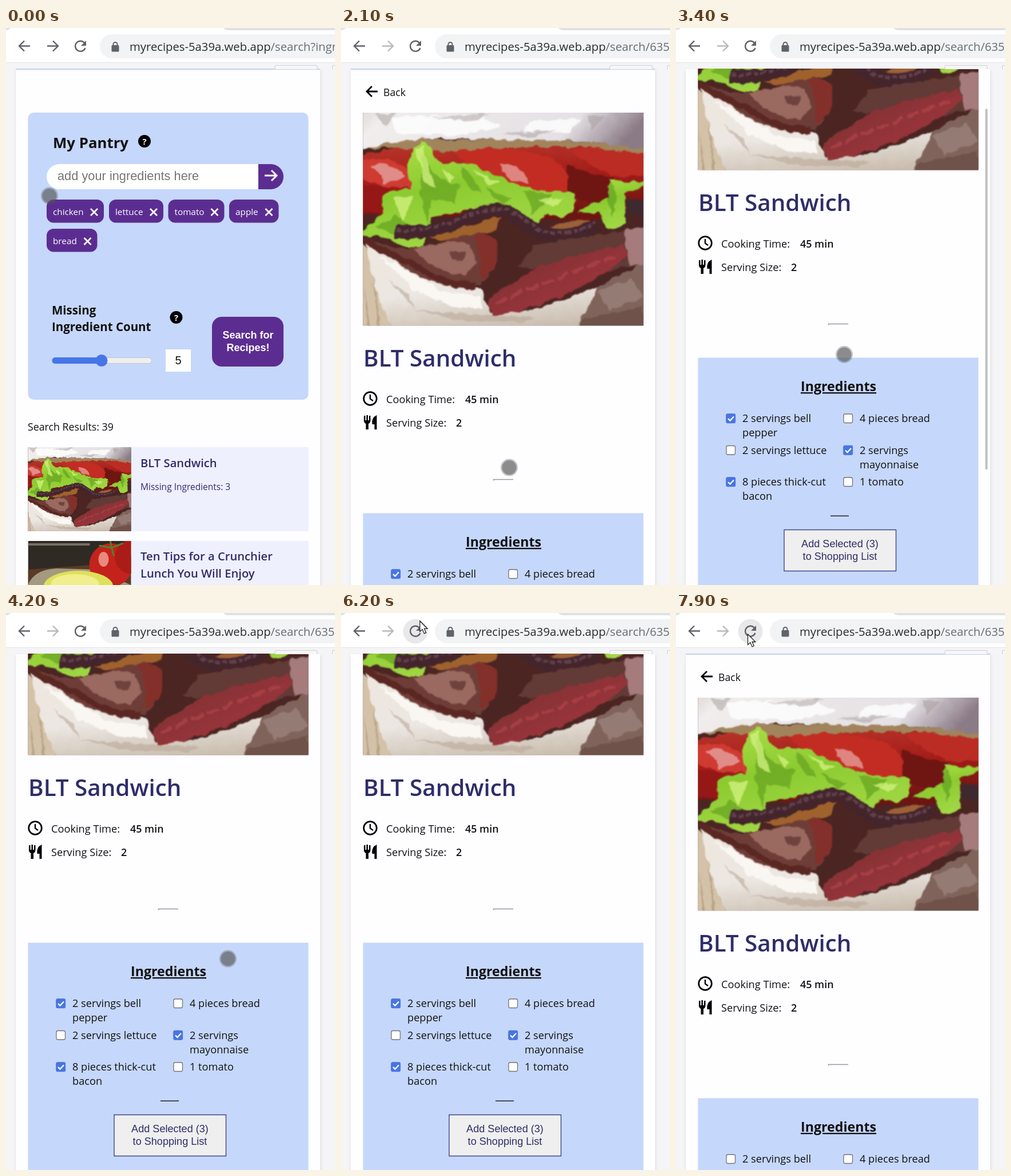
Animation of 575x974 px, one loop 8 s. Source, as an HTML page:

```html
<!DOCTYPE html>
<html lang="en">
<head>
<meta charset="utf-8">
<title>Pantry recipes</title>
<style>
  html, body { margin: 0; width: 100%; height: 100%; overflow: hidden; background: #fff; }
  svg { display: block; }
  text { font: 18.2px "Open Sans", "Noto Sans", sans-serif; fill: #111; }
  .sans { font-family: "Liberation Sans", Arial, sans-serif; }
  .mid { text-anchor: middle; }
  .semi { font-weight: 600; }
  .bold { font-weight: 700; }
  .navy { fill: #2e2d69; }
  .white { fill: #fff; }
  .purple { fill: #5c2d91; }
  .panel { fill: #c5d7fb; }
  .line { fill: none; stroke: #5f6368; stroke-width: 2.4; }
</style>
</head>
<body>
<svg width="575" height="974" viewBox="0 0 575 974">
  <defs>
    <clipPath id="view"><path d="M0 71H575V974H0z"/></clipPath>
    <filter id="rough" x="0" y="0" width="1" height="1" color-interpolation-filters="sRGB">
      <feTurbulence type="fractalNoise" baseFrequency=".06" numOctaves="2" seed="4"/>
      <feDisplacementMap in="SourceGraphic" scale="11" xChannelSelector="R" yChannelSelector="G"/>
      <feGaussianBlur stdDeviation="1.3"/>
    </filter>
    <filter id="glow"><feGaussianBlur stdDeviation="2.5"/></filter>
    <linearGradient id="crumb" x2="1" y2=".15">
      <stop stop-color="#d3ccc6"/><stop offset=".15" stop-color="#f0edec"/>
      <stop offset=".78" stop-color="#e4e0e4"/><stop offset="1" stop-color="#8b7b86"/>
    </linearGradient>
    <linearGradient id="red" y2="1" x2=".2">
      <stop stop-color="#b8372b"/><stop offset=".5" stop-color="#a51d19"/><stop offset="1" stop-color="#6d1512"/>
    </linearGradient>
    <linearGradient id="leaf" x2=".4" y2="1">
      <stop stop-color="#aee04a"/><stop offset=".5" stop-color="#8ccb30"/><stop offset="1" stop-color="#a2d846"/>
    </linearGradient>
    <linearGradient id="rasher" y2="1">
      <stop stop-color="#74302f"/><stop offset=".6" stop-color="#96343a"/><stop offset="1" stop-color="#7a2531"/>
    </linearGradient>
    <linearGradient id="loaf" x2=".2" y2="1">
      <stop stop-color="#efe7de"/><stop offset=".6" stop-color="#ece7e2"/><stop offset="1" stop-color="#c9bdae"/>
    </linearGradient>
    <symbol id="photo" viewBox="0 0 490 372" preserveAspectRatio="xMidYMid slice">
      <path fill="#4a2522" d="M0 0H490V372H0z"/>
      <g filter="url(#rough)">
        <path fill="#4a2522" d="M-20-20H510V392H-20z"/>
        <path fill="#d3c1a8" d="M-20 215L80 290 130 392H-20z"/>
        <path fill="#b8a284" d="M14 260L34 392H29zM30 310L60 392H53zM4 300L14 392H8z"/>
        <path fill="url(#loaf)" d="M5 222Q60 255 130 296L205 306 222 350 290 346 410 305 370 392H60Q16 320 5 222z"/>
        <path fill="#faf7f3" d="M30 252Q90 280 140 312L205 320 208 345 150 338 90 310z"/>
        <path fill="#bba99a" d="M90 345L200 352 300 358 280 366 180 364zM44 290L80 318 92 344z" opacity=".6"/>
        <path fill="#80645c" d="M365 392L410 305 510 250V392z"/>
        <path fill="#a28a82" d="M410 312L470 290 490 320 430 345z" opacity=".6"/>
        <path fill="#65463f" d="M380 362L490 338V385H375z" opacity=".6"/>

        <path fill="url(#red)" d="M-20 80L80 55 150 60 400 56 510 70V150L400 190 80 180-20 180z"/>
        <path fill="#cf3a31" d="M-10 84Q70 70 100 120L104 136 40 128-10 112z"/>
        <path fill="#e6a8a8" d="M14 92Q50 84 76 112L40 122z" opacity=".75"/>
        <path fill="#951817" d="M-10 122L50 130 35 176H-10z"/>
        <path fill="#c22c23" d="M150 66Q260 55 330 80 372 110 358 138 300 146 230 118z"/>
        <path fill="#e59b97" d="M235 88Q285 92 290 124 255 124 235 88z" opacity=".8"/>
        <path fill="#ba2c24" d="M365 66Q430 55 500 72V112L440 110Q390 94 365 66z"/>
        <path fill="#6f1613" d="M355 90Q400 110 440 112L425 165 360 145z"/>
        <path fill="#a1845c" d="M5 62Q60 42 150 48L300 46 510 60V74L380 60 250 60 150 68 60 62z"/>
        <path fill="url(#crumb)" d="M-20-20H510V66Q400 48 300 48L150 46Q60 44 5 64L-20 60z"/>
        <path fill="#fff" opacity=".8" d="M50 8L200 4 240 24 170 40 60 36zM290 14L380 10 360 36 280 34z"/>
        <path fill="#a49c9a" opacity=".5" d="M20 4L60 0 40 24zM120 8L220 2 190 16zM390 4L420 8 400 30zM240 36L340 30 300 42z"/>

        <path fill="url(#leaf)" d="M0 206L34 176 34 148 50 136 84 134 78 90 88 62 104 50 120 60 122 78 142 90 190 86 212 100 254 118 300 136 368 140 370 166 352 184 322 176 306 194 280 186 240 164 180 170 120 182 106 236 80 236 36 218-10 214z"/>
        <path fill="#69a522" opacity=".75" d="M106 66Q112 110 168 128L160 160 120 150 112 196 100 140zM170 94Q170 130 205 140 200 110 170 94zM280 136Q300 160 290 180 320 160 330 144zM20 198L60 180 84 200 50 212zM214 130L260 150 240 160z"/>
        <path fill="#d5f383" opacity=".75" d="M90 66L106 58 116 100 128 130 110 124zM52 148L90 144 70 190zM140 98L160 110 150 120zM190 100L240 122 220 126zM306 150L350 150 330 166z"/>
        <path fill="url(#leaf)" d="M430 116Q460 124 500 118V126L456 142 458 194 440 204 424 198 412 174 376 174 396 160 430 150z"/>
        <path fill="#5a9a20" d="M432 122L444 146 436 184 428 150z" opacity=".6"/>
        <path fill="#3f2930" d="M458 148L500 156V184L458 172z"/>

        <path fill="#a0622c" d="M110 216L190 196 246 178 232 204 150 224z"/>
        <path fill="#9c6137" d="M310 210Q350 184 405 190L396 212 340 222z"/>
        <path fill="none" stroke="#44252b" stroke-width="23" stroke-linejoin="round" d="M55 208Q110 212 160 194 220 166 252 172 276 188 300 205 350 228 409 196"/>
        <path fill="none" stroke="#765064" stroke-width="6" opacity=".6" stroke-dasharray="9 4" d="M58 204Q110 207 158 190 220 162 255 169 290 192 308 204 350 222 407 192"/>

        <path fill="#6f3d37" d="M4 215Q50 244 96 236L190 212Q210 206 222 216 244 260 212 294 190 312 150 302 80 290 4 215z"/>
        <path fill="#9a6a60" d="M90 240Q150 218 186 232 212 268 178 282 130 286 90 240z"/>
        <path fill="#5d3231" d="M150 244L180 240 176 260 158 258z" opacity=".7"/>
        <path fill="#83302a" d="M194 214Q230 204 236 240 236 276 206 292 206 240 194 214z"/>
        <path fill="none" stroke="#5a2723" stroke-width="11" d="M4 220Q45 252 90 264 130 300 198 302"/>
        <path fill="#623a36" d="M300 230L500 200V262L400 280 270 270z"/>
        <path fill="#a57b7b" d="M455 206L500 198V264L466 268z"/>
        <path fill="url(#rasher)" d="M218 336Q222 318 252 302L310 268 370 250 456 230 463 250 400 294 340 324 280 345 226 355z"/>
        <path fill="none" stroke="#b5494d" stroke-width="6" opacity=".6" stroke-dasharray="22 7" d="M232 334Q290 305 350 285L448 248"/>
      </g>
    </symbol>
    <g id="help">
      <circle r="11"/>
      <text class="mid bold white" y="5.5" style="font-size:15px">?</text>
    </g>
    <path id="left" d="M20 0H1M10-9L1 0 10 9"/>
  </defs>

  <path fill="#f5f4f6" d="M0 0H575V974H0z"/>
  <path fill="#dcdbe0" filter="url(#glow)" d="M17 74H550V990H17z"/>
  <path fill="#fefdff" d="M17 72H549V974H17z"/>

  <g clip-path="url(#view)">
    <path id="edge" fill="#c3d3f3" d="M17 71H549V73H17z"/>

    <g id="search">
      <rect class="panel" x="38.5" y="148" width="490" height="502" rx="10"/>
      <text class="bold" x="82" y="210" style="font-size:25.8px">My Pantry</text>
      <use href="#help" x="242" y="198"/>
      <path class="white" d="M441 238H93A22 22 0 0 0 93 282H441z"/>
      <path class="purple" d="M441 238H463A22 22 0 0 1 463 282H441z"/>
      <path fill="none" stroke="#fff" stroke-width="3" d="M452 258H473M464 249L473 258 464 267"/>
      <text class="sans" x="90" y="266" style="font-size:21.8px;fill:#757575">add your ingredients here</text>
      <g id="chips"></g>
      <text class="bold" x="80" y="501" style="font-size:20.5px">Missing</text>
      <text class="bold" x="80" y="530" style="font-size:20.5px">Ingredient Count</text>
      <use href="#help" x="297.5" y="506"/>
      <rect x="81" y="576.5" width="173.5" height="10" rx="5" fill="#efefef" stroke="#c4c4cc"/>
      <rect x="80.5" y="576" width="90" height="11" rx="5.5" fill="#4675e8"/>
      <circle cx="167" cy="581.5" r="10.5" fill="#4675e8"/>
      <path class="white" d="M279 562H323V601H279z"/>
      <text class="sans mid" x="301" y="588" style="font-size:20px">5</text>
      <rect class="purple" x="360" y="505" width="125" height="87" rx="17"/>
      <text class="sans mid bold white" x="423" y="543" style="font-size:18px">Search for</text>
      <text class="sans mid bold white" x="423" y="565" style="font-size:18px">Recipes!</text>
      <text x="38" y="704" style="font-size:17.8px">Search Results: 39</text>
      <path fill="#eef0fe" d="M39 733H528.5V880H39zM39 897H528.5V974H39z"/>
      <use href="#photo" x="38.5" y="733" width="180" height="147"/>
      <text class="semi navy" x="235" y="768" style="font-size:20.2px">BLT Sandwich</text>
      <text class="navy" x="235" y="808" style="font-size:15.5px">Missing Ingredients: 3</text>
      <svg x="38.5" y="897" width="180" height="77">
        <path fill="#2f2a24" d="M0 0H180V77H0z"/>
        <path fill="#777064" d="M0 4H108V8H0z"/>
        <path fill="#5b3a26" d="M0 50L110 42 180 60V77H0z"/>
        <path fill="#a39a80" d="M0 77Q10 50 50 48L120 50 180 77z"/>
        <circle cx="145" cy="42" r="38" fill="#c3231c"/>
        <circle cx="182" cy="28" r="30" fill="#a91c17"/>
        <ellipse cx="132" cy="32" rx="9" ry="13" fill="#e98a7c"/>
        <path fill="none" stroke="#55802c" stroke-width="3" d="M124 8L146 12 166 4M146 12L150 26M146 12L144 0"/>
        <ellipse cx="88" cy="80" rx="61" ry="28" fill="#dfe05a"/>
        <ellipse cx="82" cy="74" rx="42" ry="16" fill="#f0ee8d"/>
      </svg>
      <text class="semi navy" x="235" y="931" style="font-size:20.2px">Ten Tips for a Crunchier</text>
      <text class="semi navy" x="235" y="961" style="font-size:20.2px">Lunch You Will Enjoy</text>
    </g>

    <g id="recipe">
      <use href="#left" x="44" y="111" fill="none" stroke="#000" stroke-width="2.8"/>
      <text x="74" y="119" style="font-size:17.7px">Back</text>
      <use href="#photo" x="38.5" y="148" width="490" height="372.5"/>
      <text class="semi navy" x="39" y="592" style="font-size:40.4px">BLT Sandwich</text>
      <circle cx="51" cy="648" r="11.3" fill="none" stroke="#000" stroke-width="2.7"/>
      <path fill="none" stroke="#000" stroke-width="2.4" d="M51 641V648.5L56 652"/>
      <text x="79" y="656">Cooking Time:</text>
      <text class="semi" x="217" y="656" style="font-size:17.9px">45 min</text>
      <path d="M40 678H42.5V686H44.5V677H47V686H49V678H51.5V687Q51 691 48 692V702H43.5V692Q40.5 691 40 687zM62.5 677V702H58.5V693H54.5Q53 681 62.5 677z"/>
      <text x="79" y="697">Serving Size:</text>
      <text class="semi" x="201" y="697" style="font-size:17.9px">2</text>
      <path fill="none" stroke="#999" stroke-width="1.5" d="M266.5 791.5V789.5H301"/>
      <path class="panel" d="M38.5 848.5H528.5V1400H38.5z"/>
      <text class="mid bold" x="284" y="907" style="font-size:23.2px;text-decoration:underline">Ingredients</text>
      <g id="items"></g>
      <path fill="#222" d="M270 1124.5H302V1126H270z"/>
      <path fill="#efefef" stroke="#41458f" stroke-width="1.4" d="M189 1149.5H384.5V1221.5H189z"/>
      <text class="sans mid navy" x="286.5" y="1180" style="font-size:18.1px">Add Selected (3)</text>
      <text class="sans mid navy" x="286.5" y="1202" style="font-size:18.1px">to Shopping List</text>
    </g>

    <path id="spinner" fill="none" stroke="#432a75" stroke-width="5.5" d="M-36.6-36.6A51.7 51.7 0 0 1 36.6-36.6"/>
    <rect id="bar" x="540.5" width="4" height="631" rx="2" fill="#bfbfbf"/>
    <g id="touch" fill="#555">
      <circle r="15" opacity=".35"/>
      <circle r="12.5" opacity=".5"/>
    </g>
  </g>

  <path fill="#fff" d="M0 0H575V60H0z"/>
  <path fill="#dee1e6" d="M380 0H575V4H390Q383 4 380 0zM0 0H8Q6 3 0 4z"/>
  <path fill="#e4e4e6" d="M0 60H575V61H0z"/>
  <path fill="#f7f7f8" stroke="#cfcfd2" d="M470 72V67Q470 65.5 472 65.5H542Q544 65.5 544 67V72M575 65.5H572Q570.5 65.5 570.5 67V72"/>
  <circle id="hover" cx="130" cy="32" r="21.5" fill="#e8e8ea"/>
  <use class="line" href="#left" x="22" y="31.5"/>
  <use id="forward" class="line" href="#left" transform="translate(92 31.5) scale(-1 1)"/>
  <path class="line" d="M137 26A9 9 0 1 0 138.5 35"/>
  <path fill="#5f6368" d="M140 22V31H131z"/>
  <rect x="164" y="11" width="440" height="42" rx="21" fill="#f1f3f4"/>
  <rect x="184.5" y="30" width="13" height="11.5" rx="1.5" fill="#5f6368"/>
  <path class="line" style="stroke-width:2" d="M187.5 31V28.5A3.5 3.5 0 0 1 194.5 28.5V31"/>
  <text x="216" y="40" style="font-size:20.25px;fill:#2b2c2f">myrecipes-5a39a.web.app<tspan id="path" fill="#6a6e73"></tspan></text>
  <path id="arrow" fill="#fff" stroke="#222" stroke-width="1.3" d="M0 0V18.5L4.3 14.6 7.6 22 10.8 20.5 7.6 13.5H13.3z"/>
</svg>
<script>
const $ = id => document.getElementById(id);
const show = (id, on) => $(id).style.display = on ? '' : 'none';
const move = (id, x, y) => $(id).setAttribute('transform', `translate(${x} ${y})`);
const clamp = v => Math.min(1, Math.max(0, v));
const LOOP = 8000, SCROLL = 272;

const chips = [['chicken', 71, 300, 100], ['lettuce', 180, 300, 95], ['tomato', 283.5, 300, 98],
  ['apple', 390, 300, 86.5], ['bread', 71, 351, 88.5]];
$('chips').innerHTML = chips.map(([name, x, y, w]) => `
  <rect class="purple" x="${x}" y="${y}" width="${w}" height="40.5" rx="12"/>
  <text class="white" x="${x + 11}" y="${y + 27}" style="font-size:15.3px">${name}</text>
  <path stroke="#fff" stroke-width="2.8" d="M${x + w - 23} ${y + 16}l12 12m0-12l-12 12"/>`).join('');

const items = [['2 servings bell|pepper', 1], ['4 pieces bread', 0], ['2 servings lettuce', 0],
  ['2 servings|mayonnaise', 1], ['8 pieces thick-cut|bacon', 1], ['1 tomato', 0]];
$('items').innerHTML = items.map(([label, missing], i) => {
  const x = i % 2 ? 293 : 88, y = 947 + 55.5 * (i >> 1);
  const lines = label.split('|').map((s, k) => `<text x="${x + 28}" y="${y + 14 + 25 * k}">${s}</text>`);
  const tick = `<g class="tick"><rect x="${x - .5}" y="${y - .5}" width="16.5" height="16.5" rx="2.5" fill="#4675e8"/>
    <path fill="none" stroke="#fff" stroke-width="2.3" d="M${x + 3} ${y + 8}l3.5 3.5 6.5-7"/></g>`;
  return `<rect x="${x}" y="${y}" width="15.5" height="15.5" rx="2.5" fill="#fff" stroke="#767676" stroke-width="1.3"/>`
    + (missing ? tick : '') + lines.join('');
}).join('');
const ticks = document.querySelectorAll('.tick');

// Pointer stops: time, x, y
const stops = [[0, 76, 293], [250, 43, 410], [550, 100, 640], [950, 294, 769], [2100, 294, 769],
  [2600, 294, 571], [3750, 294, 571], [4100, 506, 607], [4550, -20, 596]];

function along(t) {
  const i = stops.findIndex(s => s[0] > t);
  if (i < 0) return stops.at(-1).slice(1);
  const [a, b] = [stops[i - 1], stops[i]];
  const p = (t - a[0]) / (b[0] - a[0]);
  return [1, 2].map(k => a[k] + (b[k] - a[k]) * p);
}

function draw(now) {
  const t = now % LOOP;
  const searching = t < 1700, reloaded = t >= 7050;
  const loading = !searching && t < 2000 || reloaded && t < 7500;
  const scroll = reloaded ? 0 : SCROLL * (1 - (1 - clamp((t - 2800) / 500)) ** 1.5);

  show('search', searching);
  show('recipe', !searching && !loading);
  show('edge', scroll < 2);
  move('recipe', 0, -Math.round(scroll));
  ticks.forEach(k => k.style.display = reloaded ? 'none' : '');

  show('spinner', loading);
  $('spinner').setAttribute('transform', `translate(283.7 186) rotate(${75 + (t - 7100) * .36})`);
  show('bar', t > 2820 && t < 3700);
  $('bar').setAttribute('y', .56 * scroll - 11);
  $('bar').style.opacity = clamp((3700 - t) / 200);

  show('touch', t < 4550);
  move('touch', ...along(t));
  $('path').textContent = searching ? '/search?ingredients' : '/search/6353';
  $('forward').style.opacity = searching ? 1 : .45;

  show('arrow', t >= 6200);
  show('hover', t >= 6200);
  const p = clamp((t - 6150) / 350);
  move('arrow', 140 - 14.5 * p, 10 + 27 * p);
  requestAnimationFrame(() => draw(performance.now() - start));
}
const start = performance.now();
draw(0);
</script>
</body>
</html>
```
